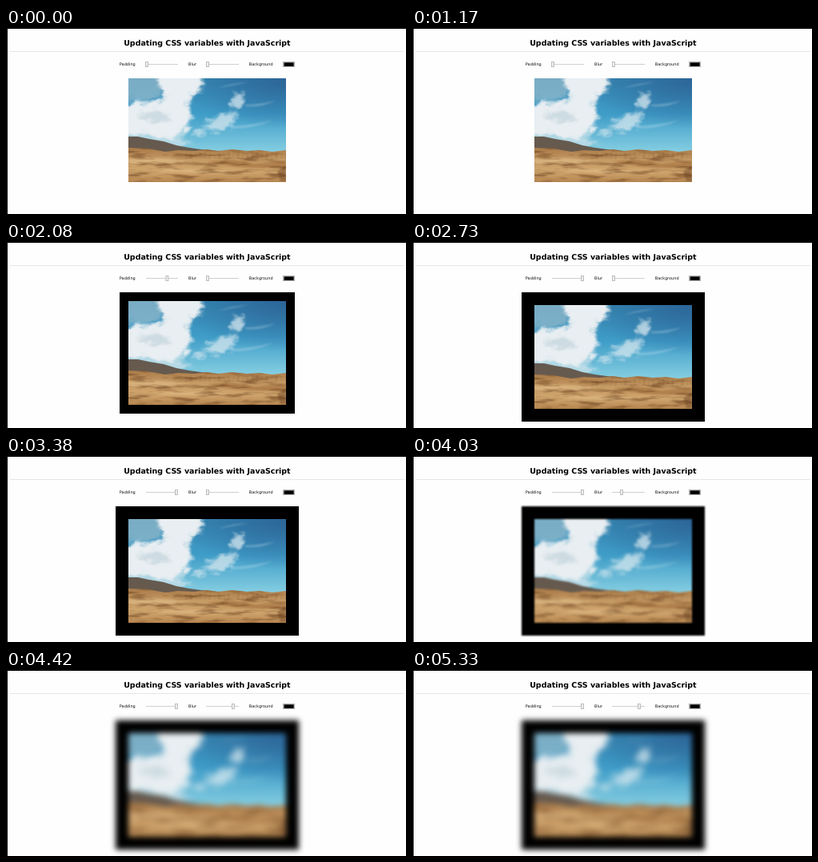
Recreate the animation shown at these times as an HTML page. Size 500 by 233 pixels, loop 8 s.

```html
<!DOCTYPE html>
<html lang="en">
<head>
<meta charset="utf-8">
<title>Updating CSS variables with JavaScript</title>
<style>
  @property --pad { syntax: "<length>"; inherits: true; initial-value: 0px; }
  @property --blur { syntax: "<length>"; inherits: true; initial-value: 0px; }

  html, body { margin: 0; width: 100%; height: 100%; overflow: hidden; background: #fefefe; }
  .stage {
    position: relative; width: 500px; height: 233px; overflow: hidden;
    animation: pad 8s step-end infinite, blur 8s step-end infinite;
  }
  .page { position: absolute; left: 0; top: 0; }
  text { font-family: "DejaVu Sans", Verdana, sans-serif; font-size: 5px; fill: #111; text-rendering: geometricPrecision; }
  .title { font-size: 9.46px; font-weight: bold; fill: #000; }
  .track { fill: #cfcfcf; }
  .thumb { fill: #ececec; stroke: #b4b4b4; stroke-width: .8; }
  .pad { transform: translateX(calc(var(--pad) * 2.3125)); }
  .blur { transform: translateX(calc(var(--blur) * 8.4)); }

  .photo {
    position: absolute; left: calc(153px - var(--pad)); top: 63px;
    padding: var(--pad); background: #000; filter: blur(var(--blur));
  }
  .photo svg { display: block; }

  /* each slider is dragged in a few hard steps */
  @keyframes pad {
    0% { --pad: 0px; }
    24.375% { --pad: 5px; }
    26% { --pad: 11px; }
    27.625%, 100% { --pad: 16px; }
  }
  @keyframes blur {
    0% { --blur: 0px; }
    50.375% { --blur: 1.2px; }
    52% { --blur: 2.6px; }
    53.625% { --blur: 3.4px; }
    55.25%, 100% { --blur: 3.8px; }
  }
</style>
</head>
<body>
<div class="stage">
  <svg class="page" width="500" height="233">
    <path d="M0 0H500V1H2V233H0Z"/>
    <text class="title" x="147.2" y="21.5">Updating CSS variables with JavaScript</text>
    <rect x="5" y="29" width="493" height="1" fill="#e6e6e6"/>

    <text x="141.8" y="47.4">Padding</text>
    <rect class="track" x="175" y="45" width="40" height="1"/>
    <rect class="thumb pad" x="174.5" y="42.4" width="3" height="6.2"/>

    <text x="228" y="47.4">Blur</text>
    <rect class="track" x="250" y="45" width="41" height="1"/>
    <rect class="thumb blur" x="250.5" y="42.4" width="3" height="6.2"/>

    <text x="303.8" y="47.4">Background</text>
    <rect x="346.5" y="42.5" width="14" height="6" fill="#dcdcdc" stroke="#b0b0b0"/>
    <rect x="347.5" y="43.3" width="12.2" height="4.6"/>
  </svg>

  <div class="photo">
    <svg width="197" height="130" viewBox="0 0 197 130">
      <defs>
        <linearGradient id="sky" x2="0" y2="1">
          <stop offset="0" stop-color="#3587b2"/>
          <stop offset=".35" stop-color="#3f9dc8"/>
          <stop offset=".7" stop-color="#83cde1"/>
        </linearGradient>
        <radialGradient id="deep" cx="1" cy="0" r=".7">
          <stop offset="0" stop-color="#2c6598"/>
          <stop offset="1" stop-color="#2c6598" stop-opacity="0"/>
        </radialGradient>
        <linearGradient id="land" x2="0" y2="1">
          <stop offset="0" stop-color="#a97a48"/>
          <stop offset=".35" stop-color="#c69a64"/>
          <stop offset=".7" stop-color="#d0a56d"/>
          <stop offset="1" stop-color="#b5854f"/>
        </linearGradient>
        <filter id="cloud" x="-30%" y="-30%" width="160%" height="160%" color-interpolation-filters="sRGB">
          <feTurbulence type="fractalNoise" baseFrequency=".07 .11" numOctaves="3" seed="4" result="noise"/>
          <feGaussianBlur in="SourceGraphic" stdDeviation="2"/>
          <feDisplacementMap in2="noise" scale="14" xChannelSelector="R" yChannelSelector="G"/>
        </filter>
        <filter id="streaks" x="0" y="0" width="100%" height="100%" color-interpolation-filters="sRGB">
          <feTurbulence type="fractalNoise" baseFrequency=".035 .2" numOctaves="3" seed="7"/>
          <feColorMatrix values="0 0 0 0 .36  0 0 0 0 .2  0 0 0 0 .08  3 0 0 0 -1.4"/>
          <feComposite in2="SourceGraphic" operator="in"/>
        </filter>
        <filter id="haze" x="-30%" y="-30%" width="160%" height="160%"><feGaussianBlur stdDeviation=".8"/></filter>
        <path id="ground" d="M0 87L24 88 46 92 62 90 82 91 98 89 112 91 130 89 148 91 164 90 180 92 197 90V130H0Z"/>
      </defs>
      <rect width="197" height="130" fill="url(#sky)"/>
      <rect width="197" height="90" fill="url(#deep)"/>

      <g filter="url(#cloud)">
        <path d="M-10 -10H46L38 24 -10 30Z" fill="#9fc0ce" opacity=".65"/>
        <path d="M-10 62L30 66 66 74 84 80 60 88 -10 82Z" fill="#cfe3ea" opacity=".7"/>
        <path d="M32 -8H84L93 3 90 16 76 25 74 36 78 46 76 60 68 72 48 77 26 70 -8 68V38L12 28 36 30 46 20 36 8Z" fill="#e8eef1"/>
        <path d="M12 44L36 40 56 50 40 55 22 54Z" fill="#cddbe2"/>
        <g fill="#d9e9ef" opacity=".75">
          <path d="M127 30L134 18 144 19 144 33 135 39 128 36Z"/>
          <path d="M94 56L106 52 118 42 130 43 134 50 128 60 112 67 101 64Z"/>
          <path d="M80 66L98 63 96 69 82 72Z"/>
        </g>
      </g>
      <path d="M146 33Q162 33 184 28Q166 37 146 35ZM132 60Q160 58 182 52Q158 63 132 63ZM112 12Q128 6 150 5Q130 9 112 12Z" fill="#d4e7ee" opacity=".3" filter="url(#haze)"/>

      <path d="M0 73L12 73 26 76 44 79 60 84 76 87 98 90V95H0Z" fill="#665a4f"/>
      <use href="#ground" fill="url(#land)"/>
      <path d="M72 98L90 96 106 99 126 95 144 98 166 96 197 99" fill="none" stroke="#77502b" stroke-width="9" stroke-dasharray="1 4 2 5" opacity=".3" filter="url(#haze)"/>
      <g filter="url(#haze)">
        <path d="M98 105Q128 99 158 107L197 104V111Q150 116 98 105Z" fill="#9a6733" opacity=".55"/>
        <path d="M0 101Q40 97 78 105Q40 109 0 107ZM30 116Q80 110 130 119Q80 119 30 116Z" fill="#ddb883" opacity=".7"/>
        <path d="M186 116L197 109V129H190Z" fill="#79542f" opacity=".6"/>
      </g>
      <use href="#ground" filter="url(#streaks)" opacity=".5"/>
    </svg>
  </div>
</div>
</body>
</html>
```
